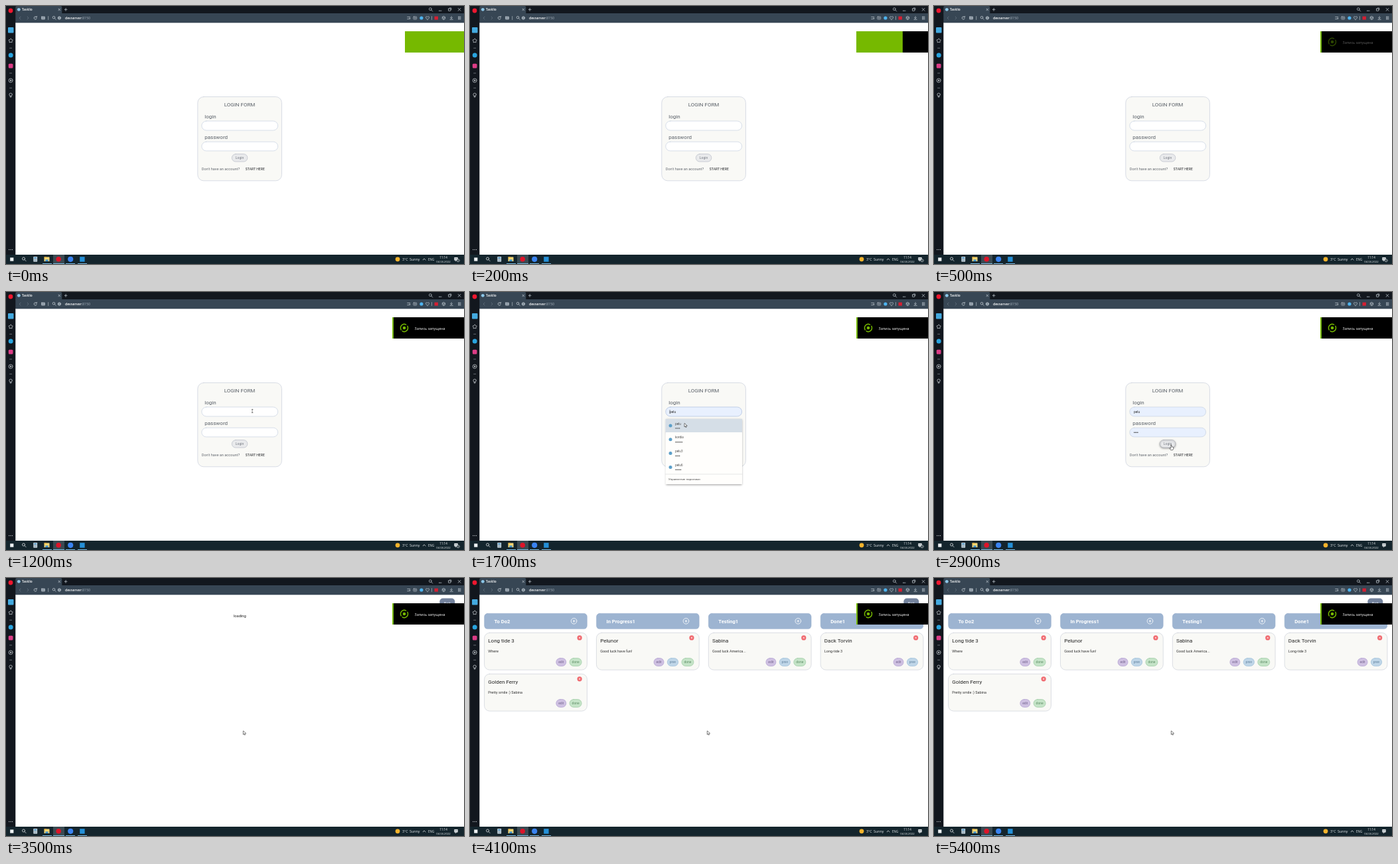
Recreate the animation shown at these times as an HTML page with a canvas. Size 690x388 px, loop 5.9 s.

```html
<!DOCTYPE html>
<html lang="en">
<head>
<meta charset="utf-8">
<title>Task board login</title>
<style>
html, body { margin: 0; width: 100%; height: 100%; overflow: hidden; background: #fff; }
canvas { display: block; width: 690px; height: 388px; }
</style>
</head>
<body>
<canvas id="stage"></canvas>
<script>
const W = 690, H = 388, LOOP = 5900, STEP = 100;
const UI = '"Open Sans", sans-serif', WEB = 'Roboto, sans-serif';
const canvas = document.getElementById('stage');
const dpr = window.devicePixelRatio || 1;
canvas.width = W * dpr;
canvas.height = H * dpr;
const c = canvas.getContext('2d');
c.scale(dpr, dpr);
c.lineCap = c.lineJoin = 'round';

const clamp = v => Math.max(0, Math.min(1, v));

function paint(fill, stroke, width = 0.7) {
  if (fill) { c.fillStyle = fill; c.fill(); }
  if (stroke) { c.strokeStyle = stroke; c.lineWidth = width; c.stroke(); }
}
function rect(x, y, w, h, fill) {
  c.fillStyle = fill;
  c.fillRect(x, y, w, h);
}
function box(x, y, w, h, r, fill, stroke, width) {
  c.beginPath();
  c.roundRect(x, y, w, h, r);
  paint(fill, stroke, width);
}
function circle(x, y, r, fill, stroke, width) {
  c.beginPath();
  c.arc(x, y, r, 0, 7);
  paint(fill, stroke, width);
}
function line(points, color, width = 0.7) {
  c.beginPath();
  for (let i = 0; i < points.length; i += 2) c.lineTo(points[i], points[i + 1]);
  paint(null, color, width);
}
function text(s, x, y, size, color, font = WEB, align = 'left', weight = 400) {
  c.font = `${weight} ${size}px ${font}`;
  c.textAlign = align;
  c.fillStyle = color;
  c.fillText(s, x, y);
}
function dots(n, x, y, gap = 1.9, color = '#333') {
  for (let i = 0; i < n; i++) circle(x + 0.9 + i * gap, y, 0.7, color);
}
function cross(x, y, r, color, width) {
  line([x - r, y - r, x + r, y + r], color, width);
  line([x - r, y + r, x + r, y - r], color, width);
}
function plus(x, y, r, color, width) {
  line([x - r, y, x + r, y], color, width);
  line([x, y - r, x, y + r], color, width);
}
function lens(x, y, r, color) {
  circle(x, y, r, null, color);
  line([x + r * 0.7, y + r * 0.7, x + r * 1.8, y + r * 1.8], color);
}

function browser() {
  const pale = '#c6ced6', dim = '#6b7986';
  rect(0, 0, W, 25, '#12171e');
  rect(0, 0, 14.3, 374, '#12171e');
  rect(14.3, 11, W, 14.3, '#374654');
  box(14.3, 0, 70, 12, [2, 2, 0, 0], '#374654');

  circle(19.3, 5.3, 2.4, '#8cc7e8');
  text('Tasklio', 24, 7.4, 4.8, '#fff', UI, 'left', 600);
  cross(80.3, 5.4, 1.4, pale);
  plus(90, 5.3, 2, pale);
  lens(639.3, 4.6, 1.9, pale);
  line([652, 7.2, 656, 7.2], pale);
  box(666.5, 4, 3.3, 3.3, 0.3, null, pale);
  line([668, 3, 670.8, 3, 670.8, 5.8], pale);
  cross(683, 5.3, 2, pale);

  line([22, 16, 20, 18, 22, 20], dim);
  line([32, 16, 34, 18, 32, 20], dim);
  c.beginPath();
  c.arc(44.3, 18, 2.1, 0.4, 5.5);
  paint(null, pale, 0.8);
  line([46.6, 15.3, 46.4, 17, 44.8, 16.8], pale);
  box(53.5, 16, 5, 4, 0.4, '#8c99a5', pale, 0.6);
  line([63.7, 15.5, 63.7, 20.5], pale, 0.6);
  lens(72, 17.2, 1.8, pale);
  circle(80.4, 18, 2.2, '#71808c', pale);
  line([78.3, 18, 82.5, 18], pale, 0.5);
  text('devserver', 89, 19.9, 5.2, '#fff', UI, 'left', 600);
  text(':8150', 89 + c.measureText('devserver').width, 19.9, 5.2, '#a8b3bd', UI);

  line([604.5, 16.5, 608.8, 16.5], pale);
  line([604.5, 19.5, 607, 19.5], pale);
  plus(608.2, 18.8, 1, pale, 0.6);
  box(613.7, 16, 5, 4, 0.7, null, pale, 0.6);
  circle(616.2, 18, 1, null, pale, 0.5);
  circle(625.9, 18, 2.6, '#4eb4ef');
  c.beginPath();
  c.moveTo(635, 20.5);
  c.bezierCurveTo(630, 17, 633.5, 14.2, 635, 16.7);
  c.bezierCurveTo(636.5, 14.2, 640, 17, 635, 20.5);
  paint(null, pale);
  line([641.4, 15.5, 641.4, 20.5], pale, 0.6);
  rect(645.5, 15.6, 5.4, 5, '#d51f32');
  c.beginPath();
  for (let i = 0; i < 6; i++) c.lineTo(659.4 + 2.5 * Math.sin(i * Math.PI / 3), 18 - 2.5 * Math.cos(i * Math.PI / 3));
  c.closePath();
  paint(null, pale);
  line([657.2, 16.8, 659.4, 18, 661.6, 16.8], pale, 0.6);
  line([659.4, 18, 659.4, 20.4], pale, 0.6);
  line([671, 15.5, 671, 18.8], pale);
  line([669.6, 17.5, 671, 18.9, 672.4, 17.5], pale);
  line([668.8, 20.3, 673.2, 20.3], pale);
  for (const y of [16.2, 18, 19.8]) line([681, y, 685, y], pale, 0.8);
}

function sidebar() {
  const pale = '#d3d8dd';
  circle(7, 7, 3.4, '#f0172f');
  box(3, 32, 8.5, 8.5, 1, '#43a9df');
  c.beginPath();
  for (let i = 0; i < 10; i++) {
    const r = i % 2 ? 2.1 : 3.3, a = i * Math.PI / 5;
    c.lineTo(7.1 + r * Math.sin(a), 52.2 - r * Math.cos(a));
  }
  c.closePath();
  paint(null, pale);
  for (const y of [63.3, 101, 123.3]) line([5.5, y, 8.7, y], '#8c939a', 0.7);
  circle(7.2, 74, 3.5, '#29a4df');
  box(3.8, 86.8, 6.7, 6.7, 1.5, '#dc3c86');
  circle(7.1, 112, 3, null, pale);
  c.beginPath();
  c.moveTo(6.2, 110.4);
  c.lineTo(8.8, 112);
  c.lineTo(6.2, 113.6);
  paint(pale);
  circle(7.1, 133.2, 2.2, null, pale);
  line([6.2, 135.5, 6.2, 137, 8, 137, 8, 135.5], pale);
  for (const x of [4.7, 7.1, 9.5]) circle(x, 366.4, 0.6, pale);
}

function taskbar(badge) {
  const light = '#eef2f4';
  rect(0, 374, W, 14, '#14252d');
  rect(71, 374, 17, 14, '#3a4a52');
  rect(6.2, 378.4, 5.2, 5.2, light);
  lens(26.5, 380, 2, light);
  box(41.3, 377, 5.8, 7.5, 0.5, '#d9e6ee');
  rect(42.2, 378, 4, 1.5, '#2f7fb4');
  for (let i = 0; i < 6; i++) rect(42.2 + (i % 3) * 1.5, 380.5 + (i > 2) * 1.7, 1, 1, '#4b6c80');
  box(57.5, 377.5, 8, 6.5, 0.5, '#f7d774');
  rect(57.5, 377.3, 3.5, 1.3, '#e6ae35');
  rect(59.3, 381.3, 4.4, 2.7, '#4594ca');
  circle(79.2, 380.8, 3.8, '#dd1429');
  circle(97.2, 380.8, 4.1, '#3a83f1');
  rect(111.2, 377.2, 7.4, 7.4, '#2490d8');
  for (const [x, w] of [[55, 14], [71, 17], [90, 14], [108, 14]]) rect(x, 387, w, 1, '#78b7df');

  circle(590, 380.8, 3.4, '#f5b32c');
  text('3°C', 597, 382.8, 5.3, light, UI);
  text('Sunny', 608, 382.8, 5.3, light, UI);
  line([628, 382, 630, 379.8, 632, 382], light);
  text('ENG', 640.6, 382.6, 4.5, light, UI, 'center');
  text('11:14', 659, 379.6, 4.5, light, UI, 'center');
  text('04.04.2022', 659, 386, 4.2, light, UI, 'center');
  box(675.3, 378, 5.4, 4.4, 0.3, light);
  line([677.2, 382.2, 677.2, 384, 679, 382.2], light, 0.6);
  line([676.4, 379.5, 679.6, 379.5], '#40505a', 0.4);
  line([676.4, 380.8, 679.6, 380.8], '#40505a', 0.4);
  if (badge) {
    circle(681.2, 382.8, 2.1, '#14252d', light, 0.5);
    text('2', 681.2, 384.1, 3.4, light, UI, 'center');
  }
}

function loginForm(t) {
  const open = t >= 1300 && t < 2100, preview = t >= 1500, filled = t >= 2100;
  const pressed = t >= 2900;
  box(288.8, 136.5, 126.6, 126.3, 9, '#f9f9f6', '#c9cfdb');
  text('LOGIN FORM', 352, 150.8, 8, '#5a6068', WEB, 'center');
  text('login', 299.2, 168.5, 8, '#5a6068');
  text('password', 299.2, 199.7, 8, '#5a6068');
  box(294.8, 173, 114.8, 14, 7, preview ? '#e8f0fe' : '#fff', open ? '#aebfdd' : '#c8d1e1');
  box(294.8, 204.2, 114.8, 13.7, 7, filled ? '#e8f0fe' : '#fff', '#c8d1e1');
  if (preview) text('pelu', 301, 181.6, 4.8, '#222');
  if (open) line([301, 177.5, 301, 182.5], '#222', 0.5);
  if (filled) dots(4, 300.8, 211.2, 1.75);

  if (pressed) { c.shadowColor = '#0005'; c.shadowBlur = 3 * dpr; c.shadowOffsetY = dpr; }
  box(340.3, 222.6, 23.5, 11.5, 5.7, '#e9eaec', pressed ? '#a9adb5' : '#b9bec8');
  c.shadowColor = 'transparent';
  text('Login', 352, 230.2, 5, '#747981', WEB, 'center');
  text("Don't have an account?", 294.8, 247.1, 5.6, '#62676e');
  text('START HERE', 360.8, 247.1, 5.1, '#202226');
  if (open) suggestions(preview);
}

function suggestions(hover) {
  c.shadowColor = '#0006';
  c.shadowBlur = 3 * dpr;
  c.shadowOffsetY = dpr;
  rect(294.5, 191, 115.5, 98, '#fffefc');
  c.shadowColor = 'transparent';
  if (hover) rect(294.5, 191, 115.5, 20, '#d5dee7');
  [['pelu', 4], ['kordia', 6], ['pelu3', 4], ['pelu6', 5]].forEach(([name, n], i) => {
    const y = 201 + i * 20.8;
    circle(302, y, 2.5, '#5c9fc9');
    text(name, 309, y - 1.4, 4.4, '#333', UI);
    dots(n, 309, y + 3.9);
  });
  line([294.5, 274, 410, 274], '#d3d6d9', 0.6);
  text('Управление паролями', 299, 283.2, 4.3, '#333', UI);
}

const PILLS = {
  edit: [15, '#cfc1e2', '#b19fd0', '#75658f'],
  prev: [16.3, '#bfd6e8', '#9dbfd9', '#5f7f9b'],
  done: [18, '#c5e4c8', '#9ccaa3', '#5f8d66'],
};
const COLUMNS = [
  ['To Do2', ['edit', 'done'], ['Long tide 3', 'Where'], ['Golden Ferry', 'Pretty smile :) Sabina']],
  ['In Progress1', ['edit', 'prev', 'done'], ['Pelunor', 'Good luck have fun!']],
  ['Testing1', ['edit', 'prev', 'done'], ['Sabina', 'Good luck America...']],
  ['Done1', ['edit', 'prev'], ['Dack Torvin', 'Long-tide 3']],
];

function card(x, y, title, note, pills) {
  box(x, y, 154.8, 55.8, 8, '#f9f9f6', '#cdd2da');
  text(title, x + 5.7, y + 14.8, 8, '#222');
  text(note, x + 5.7, y + 29.7, 5.5, '#333');
  circle(x + 143.5, y + 7.5, 3.6, '#f0686e');
  cross(x + 143.5, y + 7.5, 1, '#fff', 0.7);
  let right = x + 146.5;
  for (const name of [...pills].reverse()) {
    const [w, fill, border, ink] = PILLS[name];
    box(right - w, y + 38.2, w, 11.8, 5.9, fill, border);
    text(name, right - w / 2, y + 45.8, 5, ink, WEB, 'center');
    right -= w + 5.3;
  }
}

function board() {
  COLUMNS.forEach(([title, pills, ...cards], i) => {
    const x = 21.6 + i * 168.85;
    box(x, 53.3, 154.8, 23.3, 5, '#9db4d1', '#92aac8', 0.4);
    text(title, x + 15, 67.6, 7.6, '#fff', WEB, 'left', 700);
    circle(x + 135, 64.8, 4.3, null, '#fff', 0.8);
    plus(x + 135, 64.8, 1.7, '#fff', 0.8);
    cards.forEach(([name, note], k) => card(x, 82.4 + k * 61.9, name, note, pills));
  });
}

function notification(t) {
  const left = 582 + 19 * clamp(1 - t / 150);
  rect(left, 38, W - left, 32, '#76b900');
  const cover = 584 + 106 * (1 - clamp((t - 150) / 250)) ** 2;
  rect(cover, 38, W - cover, 32, '#000');
  c.globalAlpha = clamp((t - 370) / 350);
  for (const start of [-0.5, 2.6]) {
    c.beginPath();
    c.arc(600, 54, 5.6, start, start + 2.6);
    paint(null, '#76b900', 1.5);
  }
  circle(600, 54, 2.3, '#76b900');
  text('Запись запущена', 615.6, 56.5, 5.4, '#fff', UI);
  c.globalAlpha = 1;
}

// time, x, y of the pointer tip
const PATH = [
  [800, 560, 78], [1000, 450, 140], [1200, 371, 179], [1400, 371, 179], [1500, 352, 187],
  [1700, 323, 197.5], [1800, 323, 198], [2100, 323, 198], [2600, 312, 179],
  [2700, 395, 190], [2800, 420, 222], [2900, 357.3, 230],
];

function pointer(t) {
  if (t < PATH[0][0]) return;
  let i = PATH.findIndex(p => p[0] > t);
  if (i < 0) i = PATH.length - 1;
  const [t0, x0, y0] = PATH[i - 1], [t1, x1, y1] = PATH[i];
  const k = clamp((t - t0) / (t1 - t0));
  c.save();
  c.translate(x0 + (x1 - x0) * k, y0 + (y1 - y0) * k);
  if (t >= 1200 && t < 1500) {
    line([-1, -2.5, 1, -2.5], '#222', 0.5);
    line([0, -2.5, 0, 2.5], '#222', 0.5);
    line([-1, 2.5, 1, 2.5], '#222', 0.5);
  } else {
    const hand = t >= 2900 && t < 3500;
    const shape = hand
      ? [-0.7, 0, 0.5, 0, 0.7, 2.6, 3.4, 3.4, 3.4, 5.5, 2.4, 7.7, -0.6, 7.7, -2.6, 4.8, -1.9, 4.2, -0.7, 5]
      : [0, 0, 0, 5.4, 1.3, 4.3, 2.2, 6.2, 3.1, 5.8, 2.3, 4, 3.9, 3.8];
    c.beginPath();
    for (let j = 0; j < shape.length; j += 2) c.lineTo(shape[j], shape[j + 1]);
    c.closePath();
    paint('#fff', '#222', 0.6);
  }
  c.restore();
}

function draw(t) {
  rect(0, 0, W, H, '#fff');
  if (t < 3500) loginForm(t);
  else {
    box(653.3, 30.6, 23, 13.4, 5, '#74839d');
    text('Exit', 664.8, 39.6, 5.8, '#fff', WEB, 'center');
    if (t < 4100) text('loading', 352.3, 59.3, 5.8, '#222', WEB, 'center');
    else board();
  }
  browser();
  sidebar();
  taskbar(t < 2500);
  notification(t);
  pointer(t);
}

function frame(now) {
  draw(Math.floor((now % LOOP) / STEP) * STEP);
  requestAnimationFrame(frame);
}
requestAnimationFrame(frame);
</script>
</body>
</html>
```
